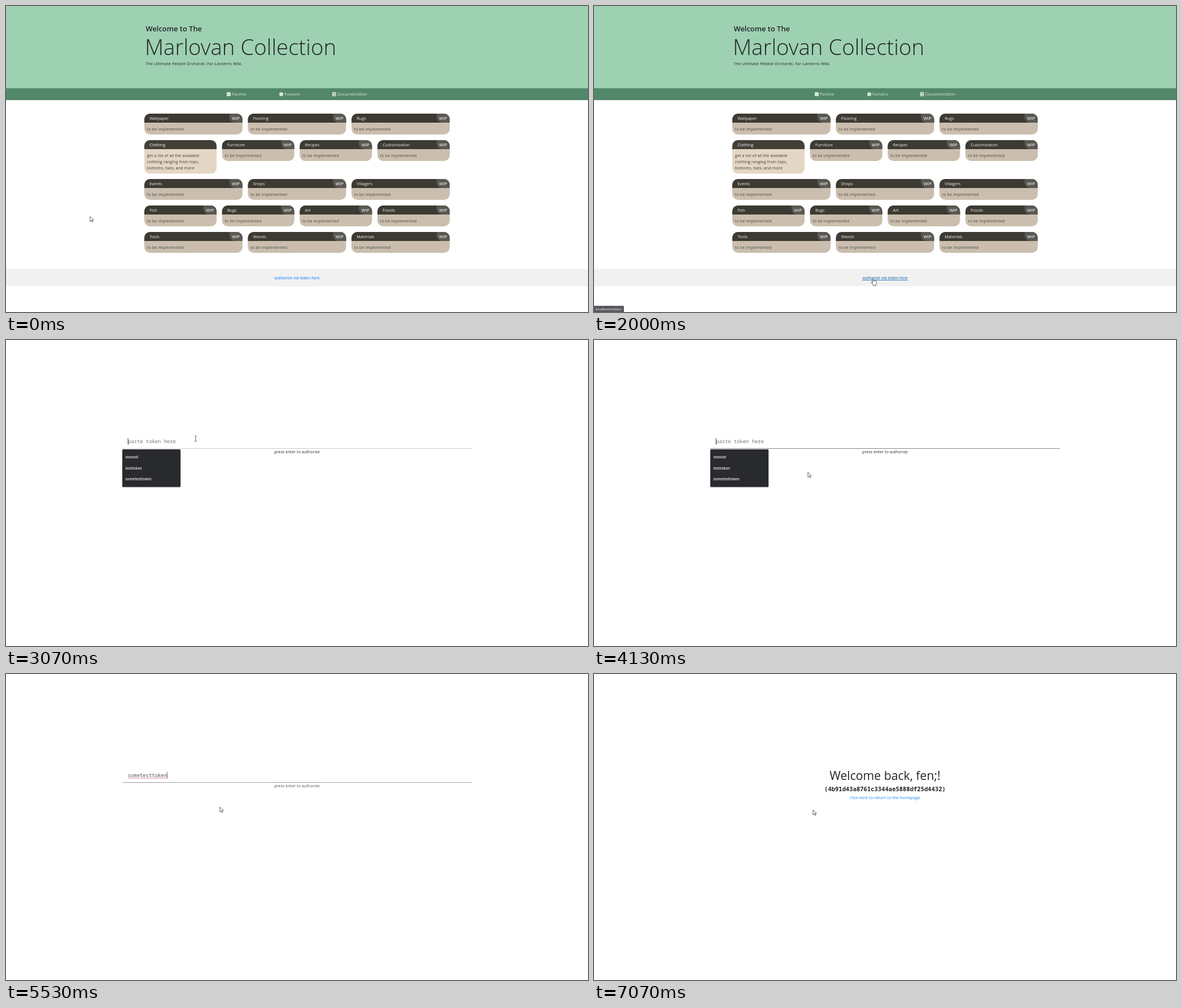
These frames come from a looping animation (1031x543 px, 8 s). An HTML page:

```html
<!DOCTYPE html>
<html lang="en">
<head>
<meta charset="utf-8">
<title>Token login</title>
<style>
  html, body { margin: 0; width: 100%; height: 100%; overflow: hidden; background: #fff; }
  svg { display: block; width: 100%; height: 100%; }
  text { font: 7.1px "Open Sans", "Noto Sans", sans-serif; white-space: pre; }
  .mid { text-anchor: middle; }
  .body { font-size: 7px; letter-spacing: .16px; }
  .bold { font-weight: 600; }
  .title { font-weight: 500; font-size: 7.2px; }
  .nav { fill: #dce8e1; letter-spacing: .1px; }
  .mono { font-family: "Noto Sans Mono", "DejaVu Sans Mono", monospace; font-size: 8.86px; }
</style>
</head>
<body>
<svg id="stage" viewBox="0 0 1031 543" xmlns="http://www.w3.org/2000/svg"></svg>
<script>
const LOOP = 8000, STEP = 1000 / 15;
const LEFT = 245, WIDTH = 541, GAP = 9.6, R = 10, HEAD = 16;

const text = (x, y, str, cls = "", attrs = "") =>
  `<text x="${x}" y="${y}" class="${cls}" ${attrs}>${str}</text>`;
const rect = (x, y, w, h, fill, attrs = "") =>
  `<rect x="${x}" y="${y}" width="${w}" height="${h}" fill="${fill}" ${attrs}/>`;
const group = (id, content, attrs = "") => `<g id="${id}" ${attrs}>${content}</g>`;

function card(x, y, w, title, lines) {
  const wip = !lines;
  lines = lines || ["to be implemented"];
  const right = x + w;
  let out = rect(x, y, w, 25.7 + 11.3 * lines.length, wip ? "#cbbeae" : "#e4d6c4", `rx="${R}"`);
  out += `<path d="M${x} ${y + HEAD}v${R - HEAD}a${R} ${R} 0 0 1 ${R} ${-R}h${w - 2 * R}a${R} ${R} 0 0 1 ${R} ${R}v${HEAD - R}z" fill="${wip ? "#3c3a32" : "#423f37"}"/>`;
  out += text(x + 9.3, y + 10.8, title, "title", `fill="${wip ? "#f0efed" : "#fff"}"`);
  if (wip) {
    out += `<path d="M${right - 23.2} ${y}h${23.2 - R}a${R} ${R} 0 0 1 ${R} ${R}v${HEAD - R}h${R - 23.2}a${R} ${R} 0 0 1 ${-R} ${-R}z" fill="#5a5852"/>`;
    out += text(right - 18.7, y + 10.8, "WIP", "bold", 'fill="#e2e1df" style="font-size:7.5px"');
  }
  lines.forEach((line, i) => {
    out += text(x + 4.8, y + 29.6 + 11.3 * i, line, "body", `fill="${wip ? "#4b4844" : "#3b3936"}"`);
  });
  return out;
}

const clothing = ["get a list of all the available", "clothing ranging from tops,", "bottoms, hats, and more"];
const rows = [
  [191, "Wallpaper Flooring Rugs"],
  [238, "Clothing Furniture Recipes Customization"],
  [307, "Events Shops Villagers"],
  [354, "Fish Bugs Art Fossils"],
  [401, "Tools Wands Materials"]
];

function cards() {
  return rows.map(([y, names]) => {
    const list = names.split(" ");
    const w = (WIDTH - GAP * (list.length - 1)) / list.length;
    return list.map((name, i) =>
      card(LEFT + i * (w + GAP), y, w, name, name === "Clothing" ? clothing : null)).join("");
  }).join("");
}

const home =
  rect(0, 0, 1031, 146, "#9ed1b2") +
  rect(0, 146, 1031, 21, "#53876a") +
  text(247.5, 44.7, "Welcome to The", "bold", 'fill="#212529" style="font-size:12.9px"') +
  text(246, 87.2, "Marlovan Collection", "", 'fill="#212529" style="font-size:38.4px;font-weight:300"') +
  text(247.3, 104.6, "The Ultimate Pebble Orchards: Far Lanterns Wiki.", "", 'fill="#212529" style="letter-spacing:.2px"') +
  rect(391, 153, 7, 7, "#d5e4db") + text(400, 159.4, "Parvine", "nav") +
  '<circle cx="487.6" cy="156.5" r="3.6" fill="#d5e4db"/>' + text(493.3, 159.4, "Funvero", "nav") +
  rect(578, 152.8, 6.6, 7.4, "#d5e4db", 'rx="1"') +
  '<path d="M579.7 154.7h3.6M579.7 156h3.6M579.2 158.7h5.4" stroke="#53876a" stroke-width=".6"/>' +
  text(587, 159.4, "Documentation", "nav") +
  cards() +
  rect(0, 466.5, 1031, 31, "#f1f1f1") +
  text(515.5, 485.1, "authorize via token here", "mid", 'id="link" style="font-size:7.6px;font-style:italic"');

const menu =
  rect(206, 195, 103.2, 67, "#000", 'rx="1.5" opacity=".18"') +
  rect(206, 194, 103.2, 66.7, "#292a2d", 'rx="1.5"') +
  ["ssssssd", "testtoken", "sometesttoken"].map((s, i) =>
    text(211.4, 210.4 + 19.3 * i, s, "bold", 'fill="#f1f1f2" style="font-size:6.4px"')).join("");

const form =
  '<path id="rule" d="M206 192.5H825" stroke-width="1"/>' +
  text(515.5, 201.4, "press enter to authorize", "mid", 'fill="#212529" style="font-size:7px;letter-spacing:.1px"') +
  text(216, 182.8, "paste token here", "mono", 'id="hint" fill="#777"') +
  text(216, 182.8, "sometesttoken", "mono", 'id="token" fill="#24282c"') +
  '<path id="spell" d="M216 185H285" stroke="#d8424a" stroke-width=".8"/>' +
  '<path id="caret" d="M0 174V185.5" stroke="#111" stroke-width=".8"/>' +
  group("menu", menu);

const welcome =
  text(515.5, 188.2, "Welcome back, fen;!", "mid", 'fill="#212529" style="font-size:21.2px"') +
  text(515.5, 208.3, "(4b91d43a8761c3344ae5888df25d4432)", "mid mono bold", 'fill="#212529" style="font-size:10.54px"') +
  text(515.5, 221.8, "click here to return to the homepage", "mid", 'fill="#1a82fb" style="letter-spacing:.11px"');

const bubble =
  '<path d="M0 543V532H51.5a1.5 1.5 0 0 1 1.5 1.5V543z" fill="#58595c"/>' +
  text(2.8, 539.8, "localhost/token/", "", 'fill="#fff" style="font-size:6.1px"');

const pointers =
  group("arrow", '<path d="M0 0V16.5l3.8-3.6 2.5 5.6 2.7-1.2-2.4-5.4h5.1z"/>') +
  group("hand", '<path d="M-1.6 14.5V1.6a1.7 1.7 0 0 1 3.4 0V8l1-.8q1.8-.6 2.4.9 2-1 2.8.9 2.8-.8 2.8 2v4.5q0 3-1.8 5.2v2.1H.2v-2L-5.6 14q-1.2-2 .5-2.8 1.2-.4 3.5 3.3z"/>') +
  group("beam", '<path d="M-3.5-9Q0-9 0-7.4Q0-9 3.5-9M0-8V8M-3.5 9Q0 9 0 7.4Q0 9 3.5 9" fill="none"/>');

document.getElementById("stage").innerHTML =
  group("home", home) + group("form", form) + group("welcome", welcome) + group("bubble", bubble) +
  group("cursor", pointers, 'fill="#fff" stroke="#222" stroke-width="1.3" stroke-linejoin="round"');

const $ = {};
document.querySelectorAll("[id]").forEach(el => { $[el.id] = el; });
const show = (el, on) => el.setAttribute("display", on ? "inline" : "none");
const clamp = v => Math.max(0, Math.min(1, v));

// Pointer stops: time, x, y
const stops = [
  [400, 149, 373.5], [600, 172, 365], [800, 232, 385], [1050, 335, 444], [1270, 403.5, 480],
  [1330, 418, 482], [1530, 471, 484.5], [1735, 493.5, 484.5], [2130, 493.5, 484.5],
  [2270, 474, 425], [2530, 382, 235], [2730, 336, 175], [3265, 336, 175],
  [3460, 350, 196], [3800, 379, 234.5], [4265, 379, 234.5], [4330, 379, 236],
  [6265, 379, 236], [6400, 387, 239.5], [6600, 387, 239.5], [6665, 388, 241]
];

function pointerAt(t) {
  if (t <= stops[0][0]) return stops[0].slice(1);
  const i = stops.findIndex(s => s[0] > t);
  if (i < 0) return stops[stops.length - 1].slice(1);
  const a = stops[i - 1], b = stops[i], k = (t - a[0]) / (b[0] - a[0]);
  return [a[1] + (b[1] - a[1]) * k, a[2] + (b[2] - a[2]) * k];
}

function draw(ms) {
  // The screen refreshes fifteen times a second
  const t = Math.floor(ms / STEP + 0.06) * STEP;
  const onHome = t < 2060, onForm = !onHome && t < 5790;
  const [x, y] = pointerAt(t);

  const hover = onHome && x > 475 && x < 556 && y > 477;
  const overInput = onForm && y < 193 && x > 206;
  show($.home, onHome);
  $.link.setAttribute("fill", hover ? "#0056b3" : "#007bff");
  $.link.setAttribute("text-decoration", hover ? "underline" : "none");

  show($.form, onForm);
  $.form.setAttribute("opacity", 1 - clamp((t - 5466) / 333));
  const focused = t > 3060, filled = t > 4395;
  $.rule.setAttribute("stroke", t > 3125 ? "#858585" : "#ccc");
  show($.hint, !filled);
  show($.token, filled);
  show($.spell, t > 4460);
  show($.menu, focused && !filled);
  const blinkOff = (t > 3590 && t < 4130) || (t > 4990 && t < 5530);
  show($.caret, focused && !blinkOff);
  $.caret.setAttribute("transform", `translate(${filled ? 285.4 : 216.2})`);

  $.welcome.setAttribute("opacity", clamp((t - 6600) / 466));

  $.bubble.setAttribute("opacity", hover ? 1 : onHome ? 0 : clamp((2200 - t) / 200));

  show($.arrow, !hover && !overInput);
  show($.hand, hover);
  show($.beam, overInput);
  $.cursor.setAttribute("transform", `translate(${x + (hover ? 1 : 0)} ${y - (hover ? 1 : 0)}) scale(.537)`);
}

function tick(now) {
  draw(now % LOOP);
  requestAnimationFrame(tick);
}
draw(0);
requestAnimationFrame(tick);
</script>
</body>
</html>
```
